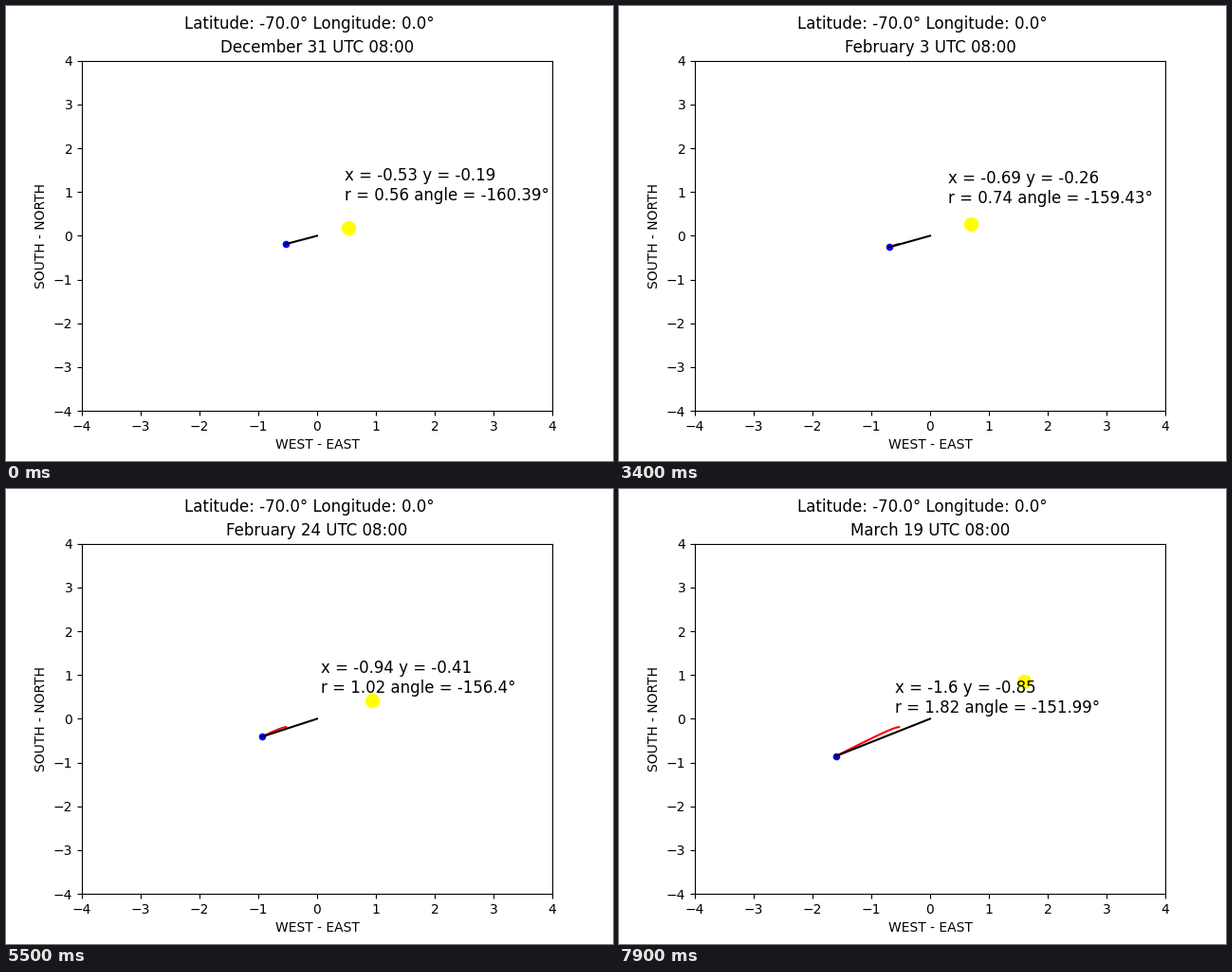
These frames come from a looping animation (640 by 480 pixels, 8000 ms). A matplotlib script:

```python
import numpy as np
import matplotlib.pyplot as plt
from matplotlib.animation import FuncAnimation

LAT, LON, HOUR = -70.0, 0.0, 8
TILT = np.radians(23.44)
YEAR = 365.25
EQUINOX = 80.3575      # day of year at which the sun crosses the equator
DAYS = 80
MONTHS = [("December", 31, 334), ("January", 31, 0),
          ("February", 29, 31), ("March", 31, 59)]


def calendar():
    """(title, day of year) for each day from December 31 on."""
    days = [(f"{name} {d}", offset + d)
            for name, length, offset in MONTHS for d in range(1, length + 1)]
    return days[30:30 + DAYS]


def shadow(day):
    """Tip of the shadow, east and north of the stick."""
    lat = np.radians(LAT)
    lam = 2 * np.pi * (day - EQUINOX) / YEAR
    dec = np.arcsin(np.sin(TILT) * np.sin(lam))
    asc = np.arctan2(np.cos(TILT) * np.sin(lam), np.cos(lam))
    hour = np.radians(15 * (HOUR - 12) + LON) + lam - asc
    east = -np.cos(dec) * np.sin(hour)
    north = (np.sin(dec) * np.cos(lat)
             - np.cos(dec) * np.sin(lat) * np.cos(hour))
    up = (np.sin(dec) * np.sin(lat)
          + np.cos(dec) * np.cos(lat) * np.cos(hour))
    scale = -np.cos(lat) / up
    return east * scale, north * scale


dates = calendar()
tips = np.array([shadow(day) for _, day in dates])

fig, ax = plt.subplots(figsize=(6.4, 4.8), dpi=100)
fig.suptitle(f"Latitude: {LAT}° Longitude: {LON}°", fontsize=12)
ax.set(xlim=(-4, 4), ylim=(-4, 4), xlabel="WEST - EAST", ylabel="SOUTH - NORTH")
title = ax.set_title("")
sun = ax.scatter([0], [0], s=100, color="yellow")
tip = ax.scatter([0], [0], s=20, color="blue")
trail, = ax.plot([], [], color="red")
stick, = ax.plot([], [], color="black")
label = ax.text(0, 0, "", fontsize=12)


def update(i):
    x, y = tips[i]
    r, angle = np.hypot(x, y), np.degrees(np.arctan2(y, x))
    title.set_text(f"{dates[i][0]} UTC {HOUR:02d}:00")
    sun.set_offsets([[-x, -y]])
    tip.set_offsets([[x, y]])
    trail.set_data(tips[:i + 1, 0], tips[:i + 1, 1])
    stick.set_data([0, x], [0, y])
    label.set_position((x + 1, y + 1))
    x, y, r, angle = (round(float(v), 2) for v in (x, y, r, angle))
    label.set_text(f"x = {x} y = {y}\nr = {r} angle = {angle}°")
    return title, sun, tip, trail, stick, label


anim = FuncAnimation(fig, update, frames=DAYS, interval=100,
                     init_func=lambda: update(0), repeat=True, repeat_delay=0)
plt.show()
```
